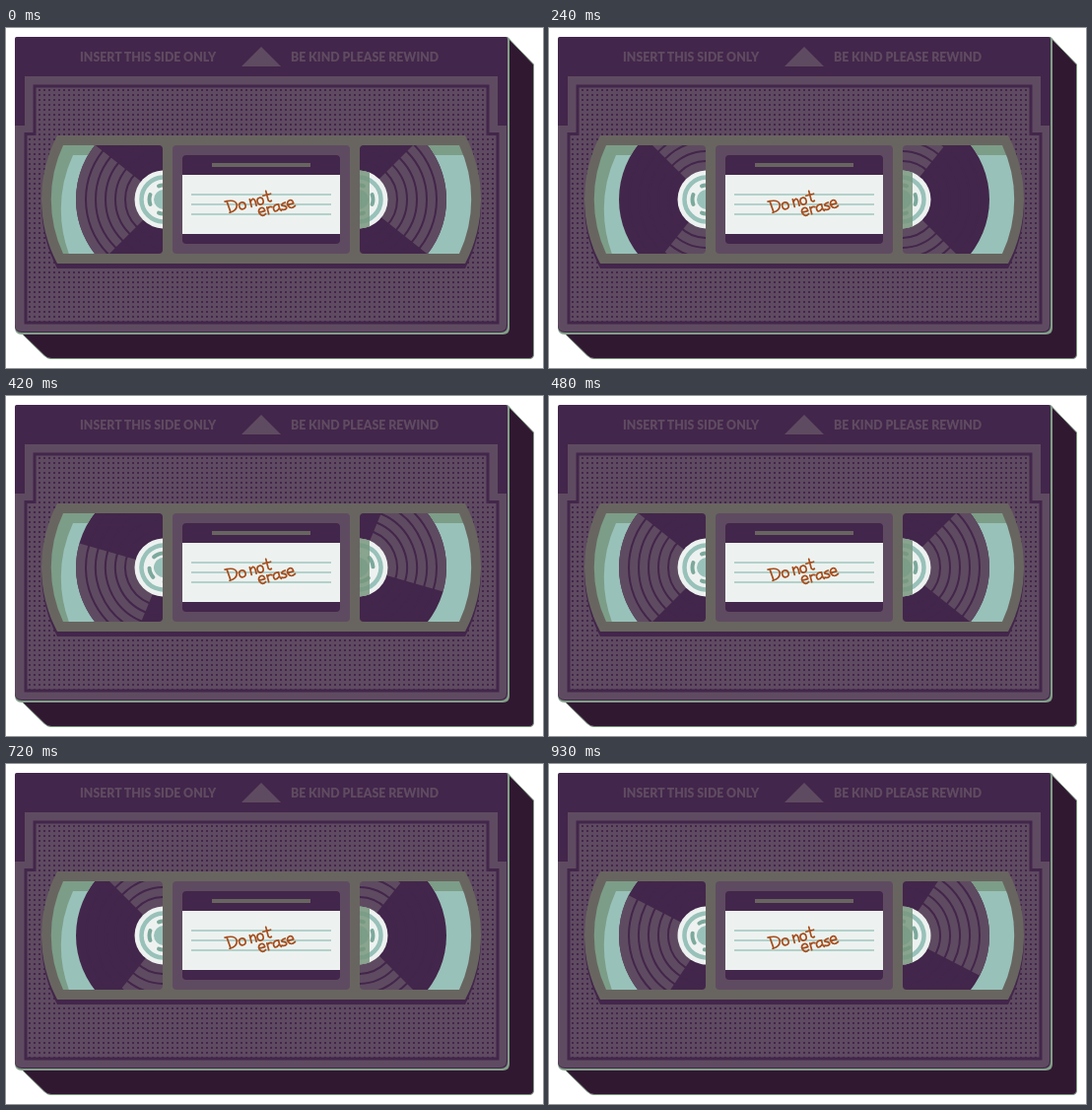
An HTML page for the animation above (960 ms loop, 545 by 345 pixels).

```html
<!DOCTYPE html>
<html lang="en">
<head>
<meta charset="utf-8">
<title>Video cassette</title>
<style>
  html, body { margin: 0; width: 100%; height: 100%; overflow: hidden; background: #fff; }
  svg { display: block; width: 545px; height: 345px; }
  .dark { fill: #43264b; }
  .mid { fill: #5f4b61; }
  .olive { fill: #686560; }
  .teal { fill: #98c1b9; }
  .paper { fill: #edf2f0; }
  .shade { fill: #77967e; fill-rule: evenodd; mix-blend-mode: darken; opacity: .85; }
  .line { fill: none; stroke: #43264b; stroke-width: 2; }
  .pen { fill: none; stroke: #a64d1c; stroke-width: 1.7; stroke-linecap: round; stroke-linejoin: round; }
  text { font: 900 12.3px Lato, sans-serif; }
</style>
</head>
<body>
<svg viewBox="0 0 545 345">
  <defs>
    <pattern id="dots" width="5" height="5" x="3" y="2" patternUnits="userSpaceOnUse">
      <rect class="dark" width="2" height="2"/>
    </pattern>
    <clipPath id="leftWindow"><path d="M58 119H155q4 0 4 4V225q0 4-4 4H58A130 130 0 0 1 58 119Z"/></clipPath>
    <clipPath id="rightWindow"><path d="M460 119H363q-4 0-4 4V225q0 4 4 4H460A130 130 0 0 0 460 119Z"/></clipPath>
    <g id="reel">
      <circle class="dark" r="89"/>
      <path id="wedge" class="mid" d="M0 0L-69.7-55.4A89 89 0 0 0-62.9 62.9Z"/>
      <use href="#wedge" transform="rotate(180)"/>
      <g class="line">
        <circle r="79"/><circle r="69"/><circle r="59"/><circle r="49"/><circle r="39"/>
      </g>
      <circle class="paper" r="29.5"/>
      <circle r="22.5" fill="none" stroke="#98c1b9" stroke-width="4.5"/>
      <circle class="teal" r="10"/>
      <circle r="14.5" fill="none" stroke="#7ca99c" stroke-width="4" stroke-linecap="round"
        pathLength="360" stroke-dasharray="40 50" stroke-dashoffset="20"/>
    </g>
  </defs>

  <!-- Case -->
  <path d="M509 9.500L535.500 37V331q0 4.500-4.500 4.500H46q-4 0-7-3L15 309Z" fill="#301831" stroke="#7f9a82"/>
  <path d="M12 9H507q4 0 4 4V304q0 7-7 7H16q-7 0-7-7V12q0-3 3-3Z" fill="#819f87"/>
  <path class="dark" d="M11 9H507q2 0 2 2V302q0 7-7 7H16q-7 0-7-7V11q0-2 2-2Z"/>
  <path class="mid" d="M19 49H499V99H508V301q0 7-7 7H16q-7 0-7-7V99H19Z"/>
  <path d="M29 59H489V107.500H499V299H20V107.500H29Z" fill="url(#dots)" stroke="#43264b" stroke-width="3"/>
  <g class="mid">
    <text x="75" y="34">INSERT THIS SIDE ONLY</text>
    <text x="289" y="34">BE KIND PLEASE REWIND</text>
    <path d="M259 19L279 39H239Z"/>
  </g>

  <!-- Window frame -->
  <path class="dark" d="M52 114H466A140 140 0 0 1 466 244H52A140 140 0 0 1 52 114Z"/>
  <path class="olive" d="M52 109H466A140 140 0 0 1 466 239H52A140 140 0 0 1 52 109Z"/>

  <!-- Reels -->
  <g clip-path="url(#leftWindow)">
    <path class="teal" d="M40 119H159V229H40Z"/>
    <use class="spin" href="#reel" data-x="160"/>
    <path class="shade" d="M30 109H170V239H30ZM68 129H175V239H68A130 130 0 0 1 68 129Z"/>
  </g>
  <g clip-path="url(#rightWindow)">
    <path class="teal" d="M359 119H480V229H359Z"/>
    <use class="spin" href="#reel" data-x="358"/>
    <path class="shade" d="M350 109H490V239H350ZM490 129H373q-4 0-4 4V239H490Z"/>
  </g>

  <!-- Label -->
  <rect class="mid" x="169" y="119" width="180" height="110" rx="4"/>
  <rect class="dark" x="179" y="129" width="160" height="90" rx="4"/>
  <path class="olive" d="M209 137H309V141H209Z"/>
  <path class="paper" d="M179 149H339V209H179Z"/>
  <path d="M188 169H330M188 179H330M188 189H330" stroke="#b3d1ca" stroke-width="2"/>
  <g class="pen" role="img" aria-label="Do not erase">
    <path transform="translate(228 187) rotate(-14.5)"
      d="M0 0L-1-12M-3-12Q8-12 8-6Q7 0-1 0M13-7C9-7 9 0 13 0C18 0 17-7 13-7M22-8V0M22-5Q26-10 27-5V0M32-7C28-7 28 0 32 0C36 0 36-7 32-7M40-12V-2Q41 0 43-1M36-8H44"/>
    <path transform="translate(258 191) rotate(-15)"
      d="M0-4H6Q6-8 3-8Q-1-7 0-3Q2 2 6-1M9-7V0M9-5Q11-8 14-6M21-7Q16-8 15-4Q15 2 21-3V-7V-2L22 0M28-7Q24-7 24-5C24-4 29-4 28-1Q26 1 23-1M30-4H36Q36-8 33-8Q29-7 30-3Q32 2 37-1"/>
  </g>
</svg>
<script>
  const STEP = 30, LOOP = 960;
  const reels = document.querySelectorAll('.spin');

  function draw() {
    const time = Math.floor(performance.now() % LOOP / STEP) * STEP;
    const angle = time / LOOP * 360;
    for (const reel of reels) {
      reel.setAttribute('transform', `translate(${reel.dataset.x} 174) rotate(${angle})`);
    }
    requestAnimationFrame(draw);
  }
  draw();
</script>
</body>
</html>
```
